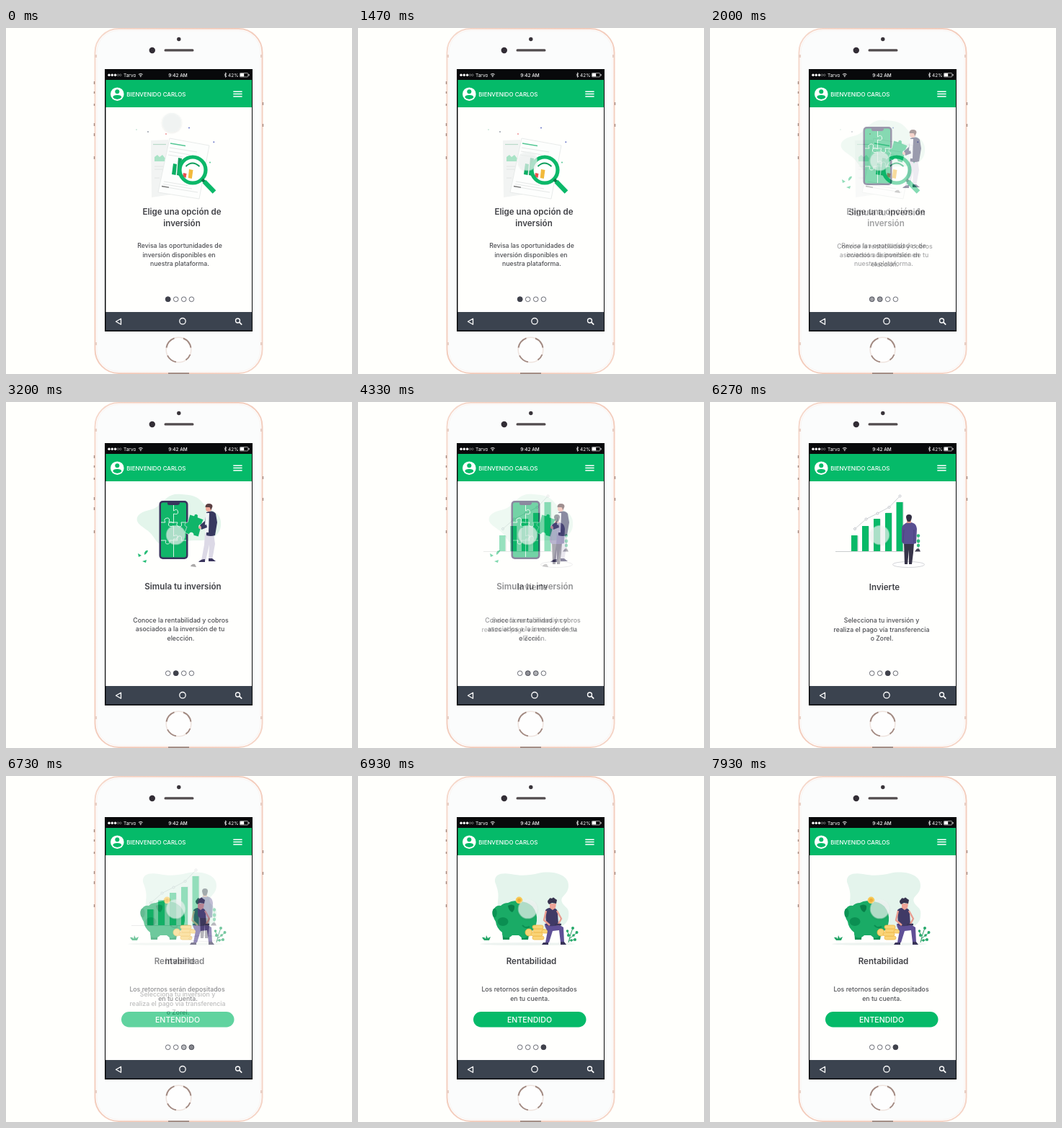
An HTML page for the animation above (8 s loop, 480 px wide and 480 px high).

```html
<!DOCTYPE html>
<html lang="es">
<head>
<meta charset="utf-8">
<title>Inversión</title>
<style>
html, body { margin: 0; width: 100%; height: 100%; overflow: hidden; background: #fffffc; }
svg { display: block; width: 100vw; height: 100vh; }
text { font-family: Inter, "Open Sans", sans-serif; }
.title { font-size: 11.6px; font-weight: 600; fill: #414247; text-anchor: middle; }
.body { font-size: 8.75px; font-weight: 500; fill: #4c4d52; text-anchor: middle; }
.status { font-size: 6.5px; fill: #fff; }
.dot { fill: #40424c; }
.simulate { animation: simulate 8s ease-in-out infinite; }
.invest { animation: invest 8s ease-in-out infinite; }
.returns { animation: returns 8s ease-in-out infinite; }
.touch { animation: move 8s infinite; }
/* Each page dissolves over the one before it, 2.35 s apart. */
@keyframes simulate { 0%, 22.5% { opacity: 0; } 27.5%, 100% { opacity: 1; } }
@keyframes invest { 0%, 51.875% { opacity: 0; } 56.875%, 100% { opacity: 1; } }
@keyframes returns { 0%, 81.25% { opacity: 0; } 86.25%, 100% { opacity: 1; } }
@keyframes move {
  0%, 1% { transform: translate(230px, 131px); animation-timing-function: ease-in-out; }
  8%, 100% { transform: translate(235.5px, 184.5px); }
}
</style>
</head>
<body>
<svg viewBox="0 0 480 480">
  <defs>
    <linearGradient id="rim" x2="1" y2="1">
      <stop stop-color="#f6d9cc"/><stop offset=".5" stop-color="#f3cdbd"/><stop offset="1" stop-color="#f5d5c7"/>
    </linearGradient>
    <filter id="soft" x="-40%" y="-40%" width="180%" height="180%">
      <feDropShadow dx="0" dy="1" stdDeviation="1.2" flood-color="#444" flood-opacity=".2"/>
    </filter>
    <g id="page">
      <rect x="138.500" y="110" width="202.500" height="284" fill="#fffffd"/>
      <g fill="#fff" stroke="#5a5c65" stroke-width=".9">
        <circle cx="224.700" cy="376.300" r="3.300"/><circle cx="235.700" cy="376.300" r="3.300"/>
        <circle cx="246.700" cy="376.300" r="3.300"/><circle cx="257.400" cy="376.300" r="3.300"/>
      </g>
    </g>
  </defs>

  <!-- Phone -->
  <rect x="123.500" y="1" width="232" height="478" rx="33" fill="#fff" stroke="url(#rim)" stroke-width="2"/>
  <rect x="126" y="3.500" width="227" height="473" rx="30" fill="#fbfcfc" stroke="#f9f3f0"/>
  <path d="M122.500 74v4M122.500 88v3M122.500 105v3M122.500 132v4M122.500 146v4M122.500 178v4M356.500 103v4M356.500 133v4" stroke="#a58a80" stroke-width="1.400"/>
  <g fill="#e9cfc4">
    <rect x="123" y="37" width="3" height="4"/><rect x="353" y="37" width="3" height="4"/>
    <rect x="123" y="436" width="3" height="4"/><rect x="353" y="436" width="3" height="4"/>
  </g>
  <rect x="225" y="478" width="29" height="2" fill="#a58f87"/>
  <circle cx="202.800" cy="31" r="4.200" fill="#322d35"/>
  <circle cx="239.800" cy="15.500" r="2.700" fill="#39343a"/>
  <rect x="219.500" y="29.300" width="41" height="3.200" rx="1.600" fill="#514b4d"/>
  <g fill="none">
    <circle cx="239.500" cy="446.500" r="17.300" fill="#fefefe" stroke="#efe4df" stroke-width="1.600"/>
    <path d="M222.500 443.500a17.300 17.300 0 0 1 11-13.200M246 430.500a17.300 17.300 0 0 1 10.500 13M255.500 453a17.300 17.300 0 0 1-6 7.600M236 463.400a17.300 17.300 0 0 1-12-9" stroke="#a28a82" stroke-width="1.900"/>
  </g>
  <rect x="137" y="57" width="205" height="364" fill="#08090b"/>

  <!-- Status bar -->
  <g fill="#fff">
    <circle cx="143" cy="65.300" r="1.700"/><circle cx="147.300" cy="65.300" r="1.700"/><circle cx="151.600" cy="65.300" r="1.700"/>
    <g fill="none" stroke="#aaa" stroke-width=".6"><circle cx="155.400" cy="65.300" r="1.300"/><circle cx="158.800" cy="65.300" r="1.300"/></g>
    <text class="status" x="163" y="67.600">Tarvo</text>
    <path d="M183.900 64.400q2.900-2.200 5.800 0M185.200 65.900q1.600-1.200 3.200 0" fill="none" stroke="#fff" stroke-width=".9"/>
    <circle cx="186.800" cy="67.200" r=".8"/>
    <text class="status" x="238.500" y="67.600" text-anchor="middle" font-weight="500">9:42 AM</text>
    <path d="M302.800 63.700l3.300 3.200-1.600 1.500v-6.400l1.600 1.500-3.300 3.200" fill="none" stroke="#fff" stroke-width=".7"/>
    <text class="status" x="308" y="67.600">42%</text>
    <rect x="324.300" y="62.500" width="11.500" height="5.400" rx="1" fill="none" stroke="#ddd" stroke-width=".7"/>
    <rect x="325" y="63.100" width="5.200" height="4.200"/><rect x="336.500" y="64" width="1" height="2.400"/>
  </g>

  <!-- Header -->
  <rect x="138.500" y="72" width="202.500" height="38" fill="#05ba69"/>
  <circle cx="154.300" cy="91.700" r="9.300" fill="#fff"/>
  <circle cx="154.300" cy="88.300" r="3" fill="#05ba69"/>
  <path d="M148.300 96.200q0-3.300 6-3.300t6 3.300q-2.300 2.900-6 2.900t-6-2.900z" fill="#05ba69"/>
  <text x="167.300" y="95" font-size="7.900" font-weight="500" fill="#fff">BIENVENIDO CARLOS</text>
  <path d="M315.300 88.200h12.300M315.300 91.600h12.300M315.300 95h12.300" stroke="#fff" stroke-width="1.500"/>

  <!-- Choose -->
  <g>
    <use href="#page"/><circle class="dot" cx="224.700" cy="376.300" r="3.700"/>
    <path d="M201 156l24-1 4 76-27 4z" fill="#f2f4f3"/>
    <path d="M204 161.500h18" stroke="#b9d9c9" stroke-width="1.200"/>
    <path d="M206 185v-6l4-3 3 3 4-3 4 5v4z" fill="#a9e3c6"/>
    <path d="M206 192h14M206 196h12M206 208h7" stroke="#e2e5e4"/>
    <path d="M227 153l55 10-14 74-57-9z" fill="#fdfefd" stroke="#e6e9e8" stroke-width=".9"/>
    <path d="M228 160l21 3.500" stroke="#55c795" stroke-width="1.300"/>
    <path d="M227 166l38 6M226 171l30 5M225 176l20 3M217 220l49 8M219 213l33 5.500M218 216.500l40 6.500" stroke="#e5e8e7"/>
    <path d="M216 219.500l10 1.700" stroke="#777" stroke-width="1.300"/>
    <path d="M232 188l5 1-1.500 15-5.500-1z" fill="#0caf64"/>
    <path d="M239 180l5 1-2.500 24-4.500-1z" fill="#159e60"/>
    <circle cx="259" cy="197" r="17.800" fill="#fff" fill-opacity=".8"/>
    <path d="M239.500 190l4 1-1 12-4-1z" fill="#35bd7e"/>
    <path d="M246 201l4.500 1-1 6-4.500-2z" fill="#e75250"/>
    <path d="M254 196l5.500 1-1.700 12-5-1z" fill="#f2b93b"/>
    <path d="M249.500 192q9-9 19 0" fill="none" stroke="#0b9d5a" stroke-width="1.800"/>
    <circle cx="259" cy="197" r="18" fill="none" stroke="#0bb869" stroke-width="5.200"/>
    <path d="M272 210l4 4" stroke="#087b48" stroke-width="4"/>
    <path d="M275 213l14 14.500" stroke="#0bb869" stroke-width="6.400"/>
    <g fill="#6c78c8">
      <circle cx="254" cy="138.500" r="1"/><circle cx="288.300" cy="158.300" r="1"/>
      <circle cx="197" cy="144" r=".9" fill="#8f97a0"/><circle cx="283" cy="186.500" r="1" fill="#55c795"/>
      <circle cx="222" cy="147" r=".9" fill="#e88"/><circle cx="181" cy="141" r=".8" fill="#a9d9c2"/>
    </g>
    <text class="title"><tspan x="244" y="259">Elige una opción de</tspan><tspan x="244" y="275">inversión</tspan></text>
    <text class="body"><tspan x="241" y="305.300">Revisa las oportunidades de</tspan><tspan x="240" y="317.800">inversión disponibles en</tspan><tspan x="241" y="330.300">nuestra plataforma.</tspan></text>
  </g>

  <!-- Simulate -->
  <g class="simulate">
    <use href="#page"/><circle class="dot" cx="235.700" cy="376.300" r="3.700"/>
    <path d="M183 158c7-9 18-6 27-13 12-10 16-19 33-17 16 1 23 3 30 12 8 10 24 12 25 26 2 21-17 27-34 26-18-1-25 8-43 7-14-1-13-12-25-21-8-6-18-11-13-20z" fill="#e3f5eb"/>
    <rect x="212.500" y="137" width="40" height="81" rx="5" fill="#39345d"/>
    <rect x="215" y="139.500" width="35" height="76" rx="3" fill="#10b569"/>
    <path d="M224 139h17v2q-1 2-3 2h-11q-3 0-3-2z" fill="#39345d"/>
    <path d="M232.500 143v8q5-4 6 1t-6 3v13q-6-4-7 1t7 3v14q5-3 6 1t-6 3v25M215 167h6q-3-5 2-6t3 6h12q-3 5 2 6t3-6h7M215 192h7q-2 5 2 5t3-5h11q-3-5 2-6t3 6h7" fill="none" stroke="#d6f5e5" stroke-width="1"/>
    <path d="M255 156l6 2c0-4 7-3 5 2l8 3-3 7c-4-1-5 5-1 6l-3 11-7-2c1-5-6-5-6-1l-6-3 3-8c-4 0-4-6 1-6z" fill="#10b569" stroke="#fff" stroke-width=".6"/>
    <path d="M276 182h12l2 15-4 22h-5l1-21-5 22h-6l4-22z" fill="#dcd9e6"/>
    <path d="M278 153q9-4 13 2l2 12-3 18q-6 2-12 0l0-13-7 3-2-4 7-6z" fill="#37395f"/>
    <path d="M277 154h5l-1 27h-5l0-10z" fill="#f1f3f6"/>
    <path d="M270 173l8-3 1 4-8 3z" fill="#37395f"/>
    <circle cx="281" cy="148" r="4" fill="#efaa9a"/>
    <path d="M276.500 146q0-5 5-5t5 4l-2 5-2-4z" fill="#5b3f42"/>
    <circle cx="269" cy="174" r="2" fill="#efaa9a"/>
    <path d="M267 222q3-4 9-4v4zM281 217h5l5 4h-10z" fill="#39345d"/>
    <path d="M183 210l5 3-4 2zM192 209q2-4 5-3-1 4-5 6zM189 221l6-2-1 4z" fill="#27bd77"/>
    <path d="M256 228q2-4 6-3l2 4z" fill="#aaa8a8"/>
    <text class="title" x="245.500" y="260">Simula tu inversión</text>
    <text class="body"><tspan x="242.500" y="305.800">Conoce la rentabilidad y cobros</tspan><tspan x="241.500" y="318.200">asociados a la inversión de tu</tspan><tspan x="242.500" y="330.500">elección.</tspan></text>
  </g>

  <!-- Invest -->
  <g class="invest">
    <use href="#page"/><circle class="dot" cx="246.700" cy="376.300" r="3.700"/>
    <path d="M174 207.500h98" stroke="#c4c8c8" stroke-width=".9"/>
    <path d="M197 207.500v-22h9v22zM212 207.500v-35h9v35zM228 207.500v-45h9v45zM244 207.500v-54h9v54zM259.500 207.500v-69h9v69z" fill="#d9dddd"/>
    <path d="M196 207v-22h8.500v22zM211 207v-35h9v35zM227 207v-45h9v45zM243 207v-53h9v53zM258.500 207v-68h9v68z" fill="#08b968"/>
    <path d="M201 176l15.500-13.500 16-8 16-8.500 15-15.500" fill="none" stroke="#c1c4c8" stroke-width=".8"/>
    <g fill="#fff" stroke="#aaaeb5" stroke-width=".7">
      <circle cx="201" cy="176" r="1.500"/><circle cx="216.500" cy="162.500" r="1.500"/><circle cx="232.500" cy="154.500" r="1.500"/>
      <circle cx="248.500" cy="146" r="1.500"/><circle cx="263.500" cy="130.500" r="1.500"/>
    </g>
    <ellipse cx="275.500" cy="225.500" rx="22" ry="4" fill="#fff" stroke="#c9cbd0" stroke-width=".8"/>
    <path d="M269 195h14l-1 14-2 16h-4l0-20-2 20h-4z" fill="#373449"/>
    <path d="M269 170q6-6 13-2 4 1 5 8l-1 20-4 1-13 0-3-3 0-16q0-7 3-8z" fill="#594f91"/>
    <path d="M269 177l-1 18M283 177v18" stroke="#453d77" stroke-width=".7"/>
    <path d="M273 163h6v5h-6z" fill="#d9968d"/>
    <path d="M272 160q0-4 4-4t4 4q-1 6-4 6t-4-6z" fill="#322f42"/>
    <path d="M289 186v18" stroke="#8ba99b" stroke-width=".7"/>
    <g fill="#31bd7b"><circle cx="289" cy="185.500" r="2.200"/><circle cx="289" cy="193" r="2.400"/><circle cx="289" cy="199" r="2.200"/></g>
    <path d="M284 207.500l3-4h3l2 4z" fill="#424052"/>
    <text class="title" x="242" y="260.500">Invierte</text>
    <text class="body"><tspan x="238" y="306.300">Selecciona tu inversión y</tspan><tspan x="238" y="318.800">realiza el pago vía transferencia</tspan><tspan x="238.500" y="331.200">o Zorel.</tspan></text>
  </g>

  <!-- Returns -->
  <g class="returns">
    <use href="#page"/><circle class="dot" cx="257.400" cy="376.300" r="3.700"/>
    <path d="M190 147c-1-11 9-13 22-11 15 3 24 2 38-1 17-4 43 0 42 18-1 14-14 13-8 24 4 6 10 6 8 18-1 13-16 18-34 20h-50c-15-3-13-17-14-30-1-16 4-18-4-38z" fill="#e4f4ec"/>
    <ellipse cx="235" cy="233" rx="66" ry="2" fill="#edf3f0"/>
    <path d="M200 214h11l-1 13h-9zM226 215h12l-2 12h-9z" fill="#0b9354"/>
    <path d="M189 184q3-5 9-4 4-4 10-4 7-4 14-2 12-1 20 7 7 9 6 20-1 11-10 17-4 8-10 7l-5-4h-9q-4 4-10 3-4-1-4-7-8-6-9-15-6-9-2-18z" fill="#1aab66"/>
    <ellipse cx="189.500" cy="190" rx="3.200" ry="6.500" fill="#0b9354"/>
    <path d="M208 180q5-3 9 0 1 5-3 9-5-2-6-9z" fill="#087f48"/>
    <ellipse cx="201" cy="202" rx="7.500" ry="6" fill="#0b8f52"/>
    <path d="M228 207q4 5 10 2" fill="none" stroke="#0b8f52" stroke-width="2"/>
    <circle cx="223.500" cy="172.300" r="4.800" fill="#f7c957"/><circle cx="223.500" cy="172.300" r="2.500" fill="#ecae38"/>
    <g stroke="#eeb748" stroke-width=".8" fill="#fad477">
      <circle cx="237" cy="217" r="5"/>
      <rect x="242" y="222" width="16" height="5" rx="2.500"/><rect x="240" y="217" width="16" height="5" rx="2.500"/>
      <rect x="243" y="212" width="16" height="5" rx="2.500"/><rect x="242" y="207" width="15" height="5" rx="2.500"/>
      <rect x="255" y="213" width="12" height="5" rx="2.500"/>
    </g>
    <path d="M259 205l18 0 8 5 1 21h-5l-2-17-9 1-5 16h-5l3-16q-4-5-4-10z" fill="#5f5096"/>
    <path d="M260 186q4-4 10-3 7 0 7 7l1 16q-7 4-17 1z" fill="#403a66"/>
    <path d="M261 187l-3 13 8 7M276 187l6 11-5 9" fill="none" stroke="#e99e91" stroke-width="2.400" stroke-linejoin="round"/>
    <path d="M273 206h9" stroke="#393458" stroke-width="2.500"/>
    <path d="M266 177h9l-1 6-4 3-4-3z" fill="#eda497"/>
    <path d="M265 178q-4-4 0-7 1-3 4-1 2-3 4 0l3 2-1 5-6-1z" fill="#37334f"/>
    <path d="M257 231h7v3h-9zM281 230h5l3 4h-8z" fill="#393458"/>
    <path d="M292 231q2-10 6-20M293 226l11-9M293 221l-3-6M293 228l9-1" fill="none" stroke="#239b62"/>
    <g fill="#25a96a">
      <circle cx="298" cy="211" r="2"/><circle cx="303.500" cy="217" r="2"/><circle cx="290.500" cy="215" r="1.800"/>
      <circle cx="292" cy="221" r="2"/><circle cx="299" cy="221" r="1.800"/><circle cx="301" cy="227" r="2"/><circle cx="296" cy="228" r="1.700"/>
    </g>
    <path d="M172 224q4-1 5 2l1-5 2 4 4-2-2 5h-7z" fill="#23a566"/>
    <text class="title" x="240.500" y="260.500">Rentabilidad</text>
    <text class="body"><tspan x="237.500" y="299.300">Los retornos serán depositados</tspan><tspan x="238.500" y="311.800">en tu cuenta.</tspan></text>
    <rect x="160" y="327" width="156.500" height="21.500" rx="10.750" fill="#05ba69"/>
    <text x="238" y="341.600" font-size="10.600" font-weight="500" fill="#fff" text-anchor="middle">ENTENDIDO</text>
  </g>

  <!-- Navigation -->
  <rect x="138.500" y="394" width="202.500" height="25.500" fill="#3b434f"/>
  <g fill="none" stroke="#fff" stroke-width="1.300">
    <path d="M159.500 403.300v8l-7-4z" stroke-linejoin="round"/>
    <circle cx="245" cy="406.700" r="4.200"/>
    <circle cx="321.500" cy="406" r="3"/><path d="M323.700 408.200l3.500 3.500" stroke-width="1.700"/>
  </g>

  <g class="touch"><circle r="13.300" fill="#f0f4f3" fill-opacity=".68" filter="url(#soft)"/></g>
</svg>
</body>
</html>
```
